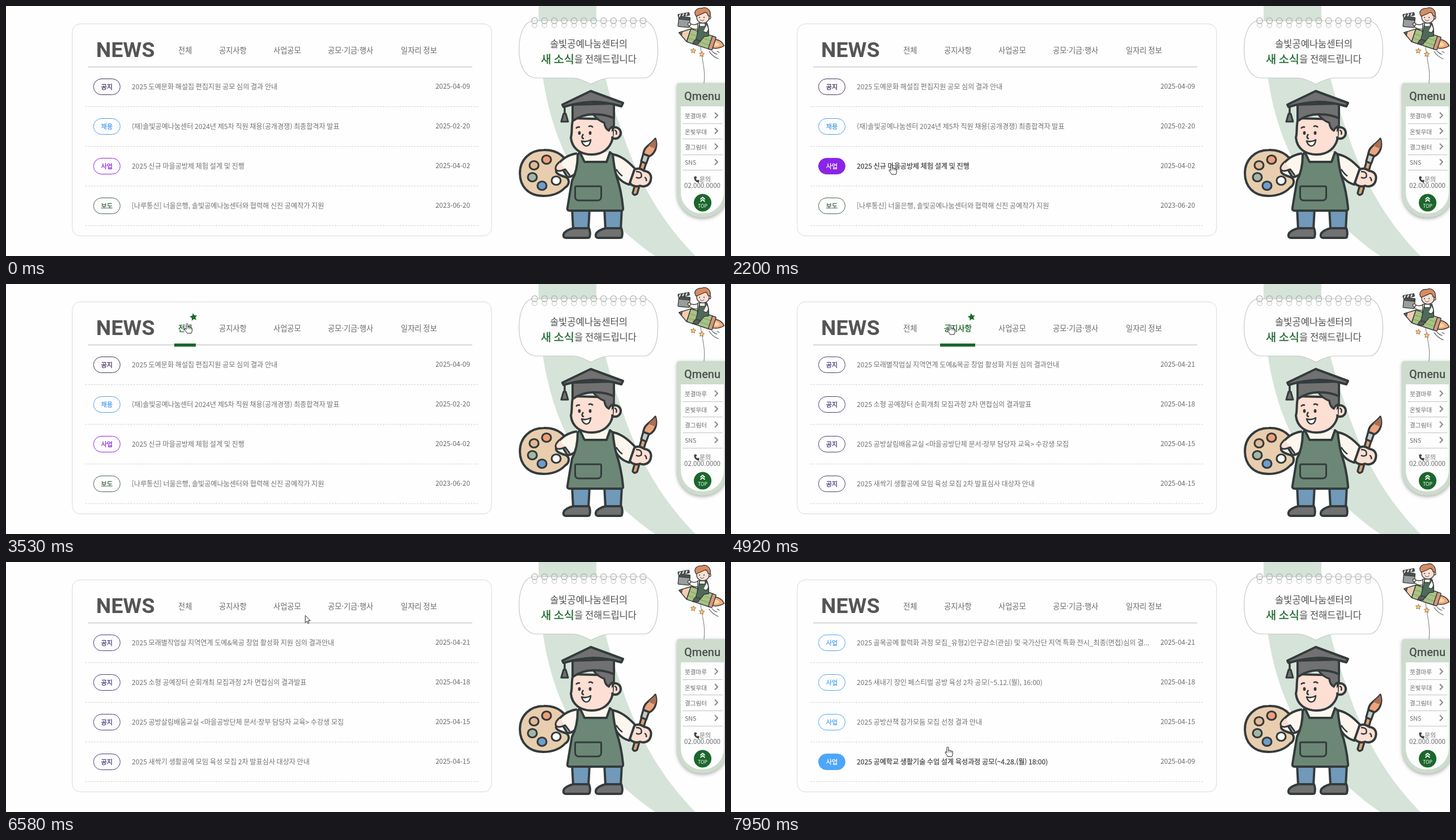
Animation, 1269 px wide and 441 px high, one loop 8000 ms. Source, as an HTML page with a canvas:

```html
<!DOCTYPE html>
<html lang="ko">
<head>
<meta charset="utf-8">
<title>News board</title>
<style>
html, body { margin: 0; width: 100%; height: 100%; overflow: hidden; background: #fefefe; }
canvas { display: block; width: 1269px; height: 441px; }
</style>
</head>
<body>
<canvas id="stage" width="1269" height="441"></canvas>
<script>
const W = 1269, H = 441, LOOP = 8000, TAU = Math.PI * 2;
const KR = '"Noto Sans CJK KR", "Noto Sans CJK", sans-serif';
const INK = '#343b3c', GREEN = '#1b672b', SKIN = '#fddfd3', CREAM = '#fcf6ee', GREY = '#717171', APRON = '#6c8776';
const screen = document.getElementById('stage').getContext('2d');
let g = screen;

const TABS = [[304, 24, '전체'], [376, 48, '공지사항'], [472, 48, '사업공모'],
  [568, 81, '공모·기금·행사'], [697, 63, '일자리 정보']];
const NOTICE = ['공지', '#4b3a80'], PROJECT = ['사업', '#4da6fb'];
const LISTS = [
  [
    [['공지', '#46305f'], '2025 도예문화 해설집 편집지원 공모 심의 결과 안내', '2025-04-09'],
    [['채용', '#4f9fee'], '(재)솔빛공예나눔센터 2024년 제5차 직원 채용(공개경쟁) 최종합격자 발표', '2025-02-20'],
    [['사업', '#8b25e6'], '2025 신규 마을공방제 체험 설계 및 진행', '2025-04-02'],
    [['보도', '#46664c'], '[나루통신] 너울은행, 솔빛공예나눔센터와 협력해 신진 공예작가 지원', '2023-06-20']
  ], [
    [NOTICE, '2025 모래별작업실 지역연계 도예&목공 창업 활성화 지원 심의 결과안내', '2025-04-21'],
    [NOTICE, '2025 소형 공예장터 순회개최 모집과정 2차 면접심의 결과발표', '2025-04-18'],
    [NOTICE, '2025 공방살림배움교실 <마을공방단체 문서·장부 담당자 교육> 수강생 모집', '2025-04-15'],
    [NOTICE, '2025 새싹기 생활공예 모임 육성 모집 2차 발표심사 대상자 안내', '2025-04-15']
  ], [
    [PROJECT, '2025 골목공예 활력화 과정 모집_유형2)인구감소(관심) 및 국가산단 지역 특화 전시_최종(면접)심의 결...', '2025-04-21'],
    [PROJECT, '2025 새내기 장인 페스티벌 공방 육성 2차 공모(~5.12.(월), 16:00)', '2025-04-18'],
    [PROJECT, '2025 공방산책 참가모둠 모집 선정 결과 안내', '2025-04-15'],
    [PROJECT, '2025 공예학교 생활기술 수업 설계 육성과정 공모(~4.28.(월) 18:00)', '2025-04-09']
  ]
];

// pointer path: time, x, y
const PATH = [[0, 338, 458], [350, 325, 360], [820, 308, 195], [1300, 300, 133], [1650, 290, 219],
  [2200, 284, 280], [2480, 282, 335], [2680, 281, 337], [3000, 283, 222], [3320, 287, 119], [3530, 320, 70],
  [4000, 324, 73], [4280, 376, 74], [4920, 387, 72], [5200, 385, 92], [5500, 370, 180], [5810, 362, 296],
  [6000, 370, 353], [6300, 435, 235], [6580, 528, 95], [6740, 506, 76], [6950, 496, 72],
  [7300, 474, 82], [7530, 440, 172], [7950, 383, 326], [8000, 380, 328]];

function pointer(t) {
  let i = 0;
  while (i < PATH.length - 2 && PATH[i + 1][0] <= t) i++;
  const a = PATH[i], b = PATH[i + 1], p = PATH[i - 1] || a, n = PATH[i + 2] || b;
  const d = b[0] - a[0], u = (t - a[0]) / d, v = 1 - u;
  return [1, 2].map(k => {
    const ma = (b[k] - p[k]) / (b[0] - p[0]) * d, mb = (n[k] - a[k]) / (n[0] - a[0]) * d;
    return v * v * (1 + 2 * u) * a[k] + u * v * v * ma + u * u * (3 - 2 * u) * b[k] - u * u * v * mb;
  });
}

function paint(path, fill, lw = 0, color = INK) {
  if (fill) { g.fillStyle = fill; g.fill(path); }
  if (lw) { g.lineWidth = lw; g.strokeStyle = color; g.stroke(path); }
}
const shape = (d, fill, lw = 4, color = INK) => paint(new Path2D(d), fill, lw, color);
function oval(x, y, rx, ry, fill, lw, color) {
  const p = new Path2D();
  p.ellipse(x, y, rx, ry, 0, 0, TAU);
  paint(p, fill, lw, color);
}
const dot = (x, y, r, fill, lw, color) => oval(x, y, r, r, fill, lw, color);
function box(x, y, w, h, r, fill, lw, color) {
  const p = new Path2D();
  p.roundRect(x, y, w, h, r);
  paint(p, fill, lw, color);
}
function star(x, y, r, turn, fill, lw, color) {
  const p = new Path2D();
  for (let i = 0; i < 10; i++) {
    const a = turn + i * TAU / 10 - TAU / 4, q = i % 2 ? r * 0.48 : r;
    p.lineTo(x + q * Math.cos(a), y + q * Math.sin(a));
  }
  p.closePath();
  paint(p, fill, lw, color);
}
function text(s, x, y, size, color, weight = 300, align = 'left', family = KR, heft = 0) {
  g.font = `${weight} ${size}px ${family}`;
  g.textAlign = align;
  g.fillStyle = color;
  g.fillText(s, x, y);
  if (heft) {
    g.lineWidth = heft;
    g.strokeStyle = color;
    g.strokeText(s, x, y);
  }
}
function dashed(x1, x2, y, color, dash) {
  g.setLineDash(dash);
  shape(`M${x1} ${y}H${x2}`, null, 1, color);
  g.setLineDash([]);
}

function drawBubble() {
  shape('M930 26H1126C1142 28 1150.5 50 1150.5 77C1150.5 105 1142 125 1128 127H1064Q1051 128 1032 138Q1014 128 1002 127H934C916 125 905.5 105 905.5 77C905.5 50 914 28 930 26Z',
    '#fefefe', 1.2, '#c3c8c4');
  for (let i = 0; i < 12; i++) {
    const x = 933 + i * 17.4;
    dot(x, 34, 4.2, '#fefefe', 1, '#bcc1bd');
    dot(x, 26, 5.3, null, 1.2, '#acb2ae');
  }
  text('솔빛공예나눔센터의', 1028.5, 73, 16.5, '#505050', 400, 'center');
  text('새 소식', 944, 100.5, 19.8, GREEN, 400, 'left', KR, 0.3);
  text('을 전해드립니다', 1003, 100, 16.5, '#505050', 400);
}

function drawArtist() {
  // legs and shoes
  for (const x of [0, 57]) {
    shape(`M${999 + x} 356H${1030 + x}L${1028 + x} 394H${1001 + x}Z`, '#7199ba');
    shape(`M${1001 + x} 392H${1029 + x}Q${1032 + x} 400 ${1030 + x} 407Q${1030 + x} 409 ${1026 + x} 409H${988 + x}Q${983 + x} 409 ${984 + x} 403Q${986 + x} 396 ${1001 + x} 392Z`, GREY);
  }
  // palette
  shape('M949 254C975 253 990 268 994 286C987 284 975 283 971 289C969 296 979 299 988 302C996 306 994 316 987 320C976 332 962 335 948 335C922 335 907 318 907 295C907 271 925 254 949 254Z', '#e8ceae');
  [[932, 281, '#e3b893'], [954, 271, '#ef9d78'], [929, 302, '#a1b7a6'], [946, 317, '#6d9dcc'], [971, 308, '#fefefe']]
    .forEach(([x, y, c]) => oval(x, y, 8, 7.5, c, 3.2));
  // arms and shirt
  shape('M1010 260C995 261 985 267 976 277L991 302C1000 301 1006 296 1009 290Z', CREAM);
  shape('M977 275C970 281 968 287 972 290C978 293 983 289 987 288L995 299', SKIN, 3);
  shape('M1066 261C1084 262 1098 274 1111 288L1100 315C1089 312 1080 305 1074 292Z', CREAM);
  shape('M1008 258H1070V300H1004Z', CREAM, 0);
  // brush
  shape('M1122 273L1130 276L1114 331Q1109 336 1106 330Z', '#dfa173', 3.5);
  shape('M1125 260L1135 264L1130 278L1121 274Z', '#c5c9c7', 3.5);
  shape('M1146 234C1150 246 1147 259 1136 265L1125 261C1126 247 1138 245 1146 234Z', '#eda47d', 3.5);
  shape('M1146 235Q1149 243 1146 251Q1139 250 1134 246Z', '#a96f55', 0);
  shape('M1109 289C1115 284 1122 288 1127 291C1136 292 1140 299 1138 307C1136 317 1127 320 1119 317C1112 320 1104 317 1101 312Z', SKIN);
  shape('M1112 292Q1124 292 1121 302Q1116 305 1112 302M1127 302Q1131 304 1130 309', null, 2.5);
  // apron
  shape('M1013 258L1021 275H1060L1066 258L1071 262Q1073 285 1078 302Q1086 325 1089 356Q1090 361 1085 361H995Q990 361 991 356Q996 325 999 308Q1009 290 1009 262Z', APRON);
  box(1004.5, 318, 46, 25, [2, 2, 6, 6], APRON, 3);
  shape('M1077 288Q1083 297 1088 300', null, 2.5);
  // head
  dot(1075, 224, 10, SKIN, 4);
  shape('M1001 198C997 212 1000 222 997 232C999 252 1014 262 1034 262C1054 262 1066 250 1070 236L1072 200Z', SKIN);
  shape('M1062 230H1071V220Z', SKIN, 0);
  shape('M1074 219Q1079 220 1077 227', null, 2.5);
  shape('M1036 191Q1046 203 1056 206Q1057 216 1064 220Q1067 213 1073 212V188Z', GREY, 3.5);
  oval(1012, 224, 2.4, 3.2, INK);
  oval(1031, 224, 2.4, 3.2, INK);
  shape('M1006 216Q1009 212 1013 214M1028 213Q1032 210 1036 214M1019 226Q1014 233 1020 234', null, 2.6);
  shape('M1016 238Q1024 241 1032 236Q1031 247 1024 247Q1018 246 1016 238Z', '#fefefe', 2.6);
  // cap
  shape('M1000 174V203Q1018 190 1040 191Q1058 191 1073 198V172Z', GREY);
  shape('M982 174L1032 150L1089 171L1086 177Q1060 169 1037 169Q1010 170 984 178Z', GREY);
  shape('M986 177V191', null, 3.5);
  shape('M984 190H988L992 204H980Z', GREY, 3);
}

function drawMenu() {
  g.save();
  g.shadowColor = 'rgba(0,0,0,.35)';
  g.shadowBlur = 6;
  g.shadowOffsetY = 2;
  box(1184.5, 136, 89, 237, [4, 4, 43, 43], '#cddccd');
  g.restore();
  box(1191, 177, 76, 189, [0, 0, 37, 37], '#fefefe');
  text('Qmenu', 1229, 166, 20, '#4c524e', 500, 'center', 'Roboto, sans-serif');
  ['붓결마루', '온빛무대', '결그림터', 'SNS'].forEach((s, i) => {
    const y = 194 + i * 27.4;
    text(s, 1198, y + 4.2, 10.6, '#6a6a6a');
    shape(`M1251 ${y - 6}L1256 ${y - 1}L1251 ${y + 4}`, null, 2.2, '#8d8d8d');
    dashed(1195, 1264, Math.round(y + 13) + 0.5, '#858585', [1, 1]);
  });
  shape('M1216 301Q1215 309 1223 310', null, 3, '#444');
  shape('M1216 301L1218 304M1220 308L1223 310', null, 4, '#444');
  text('문의', 1224, 309.5, 10.8, '#6a6a6a');
  text('02.000.0000', 1229, 320.5, 11.5, '#6a6a6a', 300, 'center');
  dot(1229.5, 347, 15.5, GREEN);
  shape('M1225.5 341L1229.5 337.5L1233.5 341M1225.5 345L1229.5 341.5L1233.5 345', null, 1.8, '#fff');
  text('TOP', 1229.5, 355.5, 8.5, '#fff', 400, 'center');
}

function drawScene() {
  g.fillStyle = '#fefefe';
  g.fillRect(0, 0, W, H);
  shape('M940 0C938 150 968 290 1090 397C1108 413 1126 428 1146 441H1217C1172 395 1122 330 1086 218C1060 145 1040 70 1042 0Z', '#d6e3d9', 0);
  box(117, 31.5, 740, 374, 14, '#fefefe', 1, '#d9d9d9');
  text('NEWS', 159, 90, 37.5, '#555', 700, 'left', 'Roboto, sans-serif');
  shape('M145 107.5H823', null, 1, '#b6b6b6');
  for (let i = 0; i < 4; i++) dashed(140, 833, 177.5 + i * 70, '#d2d2d2', [3, 2]);
  drawBubble();
  drawArtist();
  drawMenu();
}

function drawRocket(dy) {
  shape(`M1226 ${72 + dy}C1228 95 1235 112 1232 136`, null, 1, '#777');
  g.save();
  g.translate(1226, 58.5 + dy);
  g.rotate(0.32);
  shape('M24 -8Q36 -10 43 -2Q34 8 24 8Z', '#f2ab78', 1.5);
  shape('M25 -4Q32 -4 35 -1Q31 4 25 4Z', '#fbd9a4', 0);
  shape('M-22 -12L-40 1L-22 12Z', '#f3cdb0', 1.5);
  shape('M-35 -3L-40 1L-34 4Z', '#7d5c50', 1);
  box(-22, -12, 42, 24, 2, '#a9c384', 1.5);
  shape('M-21 -3H19M-21 5H19', null, 1, '#7f9c63');
  box(18, -12, 7, 24, 2, '#d9967f', 1.5);
  g.restore();
  g.save();
  g.translate(0, dy);
  // rider
  shape('M1221 31Q1213 35 1206 30L1204 34Q1212 43 1222 40Z', CREAM, 1.3);
  shape('M1221 30H1237Q1241 40 1240 51H1220Z', CREAM, 1.3);
  shape('M1224 30V36H1234V30H1237Q1241 42 1240 53L1232 54L1225 63L1217 60L1221 47Z', '#4f6a59', 1.3);
  shape('M1225 61L1222 67H1212Q1213 61 1218 59Z', '#5d5a58', 1.3);
  shape('M1237 33Q1243 42 1236 47L1231 45', CREAM, 1.3);
  dot(1241, 20, 3, SKIN, 1.2);
  oval(1230, 20, 11, 10, SKIN, 1.3);
  shape('M1218 18C1212 9 1220 3 1228 4C1236 0 1245 7 1243 18L1239 17Q1238 11 1234 11Q1226 15 1218 18Z', '#d98c61', 1.3);
  dot(1224, 20, 1, INK);
  dot(1232, 20, 1, INK);
  shape('M1225 24Q1229 28 1232 24', '#fff', 1);
  // clapperboard
  g.save();
  g.translate(1197, 26);
  g.rotate(0.1);
  box(-10, -3, 20, 14, 1, '#9a9d9b', 1.3);
  box(-10, -7, 20, 5, 1, '#4d5150', 1.2);
  g.rotate(-0.28);
  box(-9, -13, 20, 5, 1, '#4d5150', 1.2);
  shape('M-5 -12L-7 -9M1 -12L-1 -9M7 -12L5 -9', null, 2, '#eee');
  g.restore();
  dot(1206, 32, 2.6, SKIN, 1.1);
  star(1213, 79, 4.8, 0.1, '#f6cf83', 1, '#a76d3b');
  star(1228, 85, 4.8, 0.1, '#f6cf83', 1, '#a76d3b');
  shape('M1241 80Q1247 89 1257 93M1246 79Q1250 84 1255 85M1255 80L1259 82', null, 1.1, '#555');
  g.restore();
}

function drawTabs(active) {
  TABS.forEach(([x, w, label], i) => {
    const on = i === active;
    text(label, x, 83, 13.2, on ? GREEN : '#686868', on ? 400 : 300, 'left', KR, on ? 0.4 : 0);
    if (!on) return;
    g.fillStyle = GREEN;
    g.fillRect(x - 7, 105, w + 14, 5.5);
    star(x - 7 + (w + 14) * 0.895, 58.5, 7, -0.15, GREEN);
  });
}

function drawRows(list, active) {
  list.forEach(([[tag, color], title, date], i) => {
    const y = 142 + i * 70, on = i === active;
    box(154.5, y - 13.5, 47, 28, 14, on ? color : '#fefefe', 1, color);
    text(tag, 178, y + 4.5, 11.2, on ? '#fff' : color, 400, 'center', KR, 0.3);
    text(title, 222, y + 4.5, 12.1, on ? '#444' : '#727272', on ? 400 : 300, 'left', KR, on ? 0.25 : 0);
    text(date, 819, y + 4.3, 11.9, '#6a6a6a', 300, 'right');
  });
}

function drawPointer(x, y, hand) {
  g.save();
  g.translate(x, y);
  if (hand) {
    shape('M-2 9V1.5Q-2 0 -.5 0Q1 0 1 1.5V6Q3.5 5 4 6.5Q6 6 6.5 7.5Q8.5 7 8.5 9V12Q8 15 7 17H-.5Q-1 15 -4.5 11Q-5.5 8.5 -4 8.5Q-3 8.5 -2 10Z', '#fff', 1, '#222');
    shape('M1 6V9M4 7V9.5M6.5 8V10', null, 0.8, '#222');
  } else {
    shape('M0 0V12.5L2.8 9.8L4.8 14L6.8 13L4.8 9H8.5Z', '#fff', 1, '#222');
  }
  g.restore();
}

function draw(t) {
  const [x, y] = pointer(t);
  const row = y < 120 || y > 388 ? -1 : Math.floor((y - 108) / 70);
  const tab = y > 55 && y < 112 ? TABS.findIndex(b => x >= b[0] - 7 && x <= b[0] + b[1] + 7) : -1;
  const page = t < 4500 ? 0 : t < 7020 ? 1 : 2;
  g.drawImage(scene, 0, 0);
  drawTabs(tab);
  drawRows(LISTS[page], row);
  drawRocket(3 - 3 * Math.cos(TAU * (t - 80) / 2000));
  drawPointer(x, y, row >= 0 || tab >= 0);
}

const scene = document.createElement('canvas');
scene.width = W;
scene.height = H;
g = scene.getContext('2d');
for (const c of [g, screen]) c.lineJoin = c.lineCap = 'round';
g.lineCap = 'butt';
drawScene();
g = screen;

const start = performance.now();
function tick() {
  draw((performance.now() - start) % LOOP);
  requestAnimationFrame(tick);
}
tick();
</script>
</body>
</html>
```
